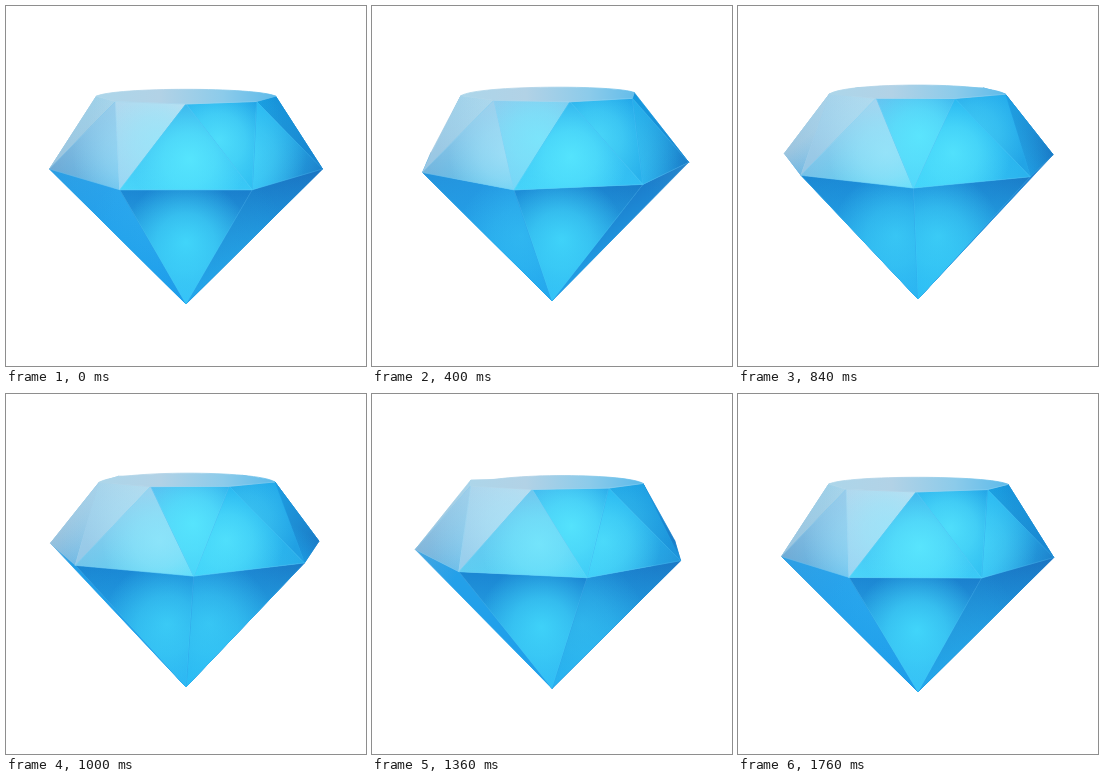
An HTML page with a canvas that plays this animation: 360x360 px, repeating every 1800 ms.

```html
<!DOCTYPE html>
<html lang="en">
<head>
<meta charset="utf-8">
<title>Turning diamond</title>
<style>
html, body { margin: 0; width: 100%; height: 100%; overflow: hidden; background: #fff; }
canvas { display: block; width: 360px; height: 360px; }
</style>
</head>
<body>
<canvas id="stage" width="360" height="360"></canvas>
<script>
const ctx = document.getElementById('stage').getContext('2d');
const LOOP = 1800, STEP = 40, CX = 180;
const rad = deg => deg * Math.PI / 180;
const mix = (a, b, f) => a + (b - a) * f;

// Corner colours of each facet kind, one column per 30 degrees from -90 to 90.
const palette = rows => rows.map(row => row.split(' ').map(hex =>
  [0, 2, 4].map(i => parseInt(hex.slice(i, i + 2), 16))));
const UP = palette([
  'a9d3ea 98cbea a8d4ee 3cb4ec 26b4f0 28b8f2 1a9ce2',
  '9cc4de 6fa9d4 78c2e8 4ad6fa 40d4fa 30bcf4 1c98e0',
  '6fb8e4 62c0ee 5ae0fb 38c8f6 28b0ec 1c80ca 1a7ac6'
]);
const DOWN = palette([
  '9cc4de 94c6e6 98d6f4 4ad6fa 30c0f2 22a2e4 1a86d0',
  '9fd0e8 a6d2ea b2d8ee 62c0f0 28b0ee 1e9fe6 159be0',
  'a8d4ea b4d6ea c4dcee 30aeec 1c9ce4 1fa6ea 148fd8'
]);
const BASE = palette([
  '20a4ec 1c9cea 2cb8f4 36c4f8 2cc0f6 24a8ec 209ce2',
  '6ab0dc 2c9ee4 1a86d2 1c88d4 1f94de 1b80cc 1a7acc',
  '1e9ce6 2aa4ec 1c8eda 1a7ecc 1a7cc8 1a74c2 3a9ad4'
]);

function tone(row, phi) {
  const u = Math.max(0, Math.min(5.999, (phi + 90) / 30));
  const i = Math.floor(u);
  return row[i].map((v, k) => Math.round(mix(v, row[i + 1][k], u - i)));
}
const rgba = (c, a = 1) => `rgba(${c.join()},${a})`;

function girdle(deg, cy) {
  const c = Math.cos(rad(deg)), back = Math.min(c, 0);
  const r = 136.5 * (1 + 0.55 * back * back - 0.03 * (1 - Math.exp(-8 * Math.max(c, 0))));
  return [CX + r * Math.sin(rad(deg)), cy + (c < 0 ? 20 : 24) * c];
}

function rim(deg, cy) {
  const c = Math.cos(rad(deg));
  const r = 88 - 16 * c + (c < 0 ? 30 : 6) * c * c;
  const dy = c < 0 ? 3 * c - 5 * c * c : 5 * c;
  return [CX + r * Math.sin(rad(deg)), cy - 70 + dy];
}

function trace(points) {
  ctx.beginPath();
  points.forEach(p => ctx.lineTo(p[0], p[1]));
  ctx.closePath();
}

function ramp(p, q, from, to) {
  const g = ctx.createLinearGradient(p[0], p[1], q[0], q[1]);
  g.addColorStop(0, from);
  g.addColorStop(1, to);
  return g;
}

function paint(style) {
  ctx.fillStyle = ctx.strokeStyle = style;
  ctx.fill();
  ctx.stroke();
}

// Blends three corner colours; the apex fades out towards the opposite side.
function facet(apex, left, right, colors, phi) {
  const [a, l, r] = colors.map(row => tone(row, phi));
  const dx = right[0] - left[0], dy = right[1] - left[1];
  const k = ((apex[0] - left[0]) * dx + (apex[1] - left[1]) * dy) / (dx * dx + dy * dy);
  const foot = [left[0] + k * dx, left[1] + k * dy];
  ctx.lineWidth = 0.6;
  trace([apex, left, right]);
  paint(ramp(left, right, rgba(l), rgba(r)));
  paint(ramp(apex, foot, rgba(a), rgba(a, 0)));
}

function glow(x, y, radius, color, alpha) {
  const g = ctx.createRadialGradient(x, y, 0, x, y, radius);
  g.addColorStop(0, rgba(color, alpha));
  g.addColorStop(0.45, rgba(color, alpha * 0.68));
  g.addColorStop(1, rgba(color, 0));
  ctx.fillStyle = g;
  ctx.fill();
}

// Light inside a crown facet: cyan in front, paler towards the left.
function crownGlow(corners, phi, cy) {
  const [mx, my] = [0, 1].map(i => corners.reduce((sum, p) => sum + p[i], 0) / 3);
  const pale = Math.max(0, Math.min(1, -phi / 40));
  const color = [mix(88, 172, pale), mix(232, 230, pale), mix(254, 249, pale)];
  const power = Math.max(0, Math.cos(rad(phi * 0.9)));
  glow(mix(mx, 190, 0.35), mix(my, cy - 14, 0.35), 58, color, 0.9 * power);
}

function line(p, q, style, width) {
  ctx.beginPath();
  ctx.moveTo(p[0], p[1]);
  ctx.lineTo(q[0], q[1]);
  ctx.strokeStyle = style;
  ctx.lineWidth = width;
  ctx.stroke();
}

function drawTable(turn, cy) {
  const corners = [-180, -120, -60, 0, 60, 120].map(a => rim(a + turn, cy));
  const byX = [...corners].sort((p, q) => p[0] - q[0]);
  const [left, right] = [byX[0], byX[5]];
  const sheen = ctx.createLinearGradient(90, 0, 271, 0);
  sheen.addColorStop(0, '#acd6ea');
  sheen.addColorStop(0.35, '#b2d2e6');
  sheen.addColorStop(0.7, '#8ccbea');
  sheen.addColorStop(1, '#5cbaea');
  ctx.lineWidth = 0.8;
  trace(corners);
  paint(sheen);
  ctx.beginPath();
  ctx.moveTo(...left);
  ctx.bezierCurveTo(left[0] + 18, cy - 82, right[0] - 18, cy - 82, ...right);
  ctx.closePath();
  paint(sheen);
  for (const a of [-60, 0])
    line(rim(a + turn, cy), rim(a + 60 + turn, cy), 'rgba(160,222,248,.35)', 0.8);
}

function draw(time) {
  const t = time % LOOP, turn = 60 * t / LOOP;
  const drop = (1 + Math.cos(2 * Math.PI * t / LOOP)) / 2;
  const cy = 158 + 5 * drop;
  const tip = [CX, 293 + 5 * drop * drop];
  const byDepth = (p, q) => Math.abs(q) - Math.abs(p);
  const visible = angles => angles.map(a => a + turn)
    .filter(a => Math.abs(a) < 130).sort(byDepth);
  const sides = visible([-180, -120, -60, 0, 60, 120]);
  const between = visible([-150, -90, -30, 30, 90]);

  ctx.fillStyle = '#fff';
  ctx.fillRect(0, 0, 360, 360);
  ctx.lineJoin = 'round';

  for (const phi of sides) {
    const l = girdle(phi - 30, cy), r = girdle(phi + 30, cy);
    facet(tip, l, r, BASE, phi);
    const power = Math.max(0, Math.cos(rad(phi * 1.4)));
    const x = mix((l[0] + r[0] + tip[0]) / 3, CX, 0.45);
    const y = mix((l[1] + r[1]) / 2, tip[1], 0.46);
    if (Math.abs(phi) < 64) glow(x, y, 64, [68, 220, 253], 0.88 * power);
  }
  for (const phi of between.filter(a => Math.abs(a) < 75))
    line(girdle(phi, cy), tip, 'rgba(90,205,250,.2)', 0.8);

  const crown = [...sides, ...between].sort(byDepth);
  for (const phi of crown) {
    const up = sides.includes(phi);
    const [apex, base] = up ? [rim, girdle] : [girdle, rim];
    const corners = [apex(phi, cy), base(phi - 30, cy), base(phi + 30, cy)];
    facet(...corners, up ? UP : DOWN, phi);
    crownGlow(corners, phi, cy);
  }

  for (const phi of sides.filter(a => Math.abs(a) < 80)) {
    const l = girdle(phi - 30, cy), r = girdle(phi + 30, cy), top = rim(phi, cy);
    line(l, top, 'rgba(130,218,250,.18)', 0.8);
    line(r, top, 'rgba(130,218,250,.18)', 0.8);
    line(l, r, 'rgba(105,205,250,.3)', 0.8);
  }
  drawTable(turn, cy);
}

const start = performance.now();
function tick() {
  const time = Math.max(0, performance.now() - start);
  draw(Math.floor(time / STEP) * STEP);
  requestAnimationFrame(tick);
}
tick();
</script>
</body>
</html>
```
